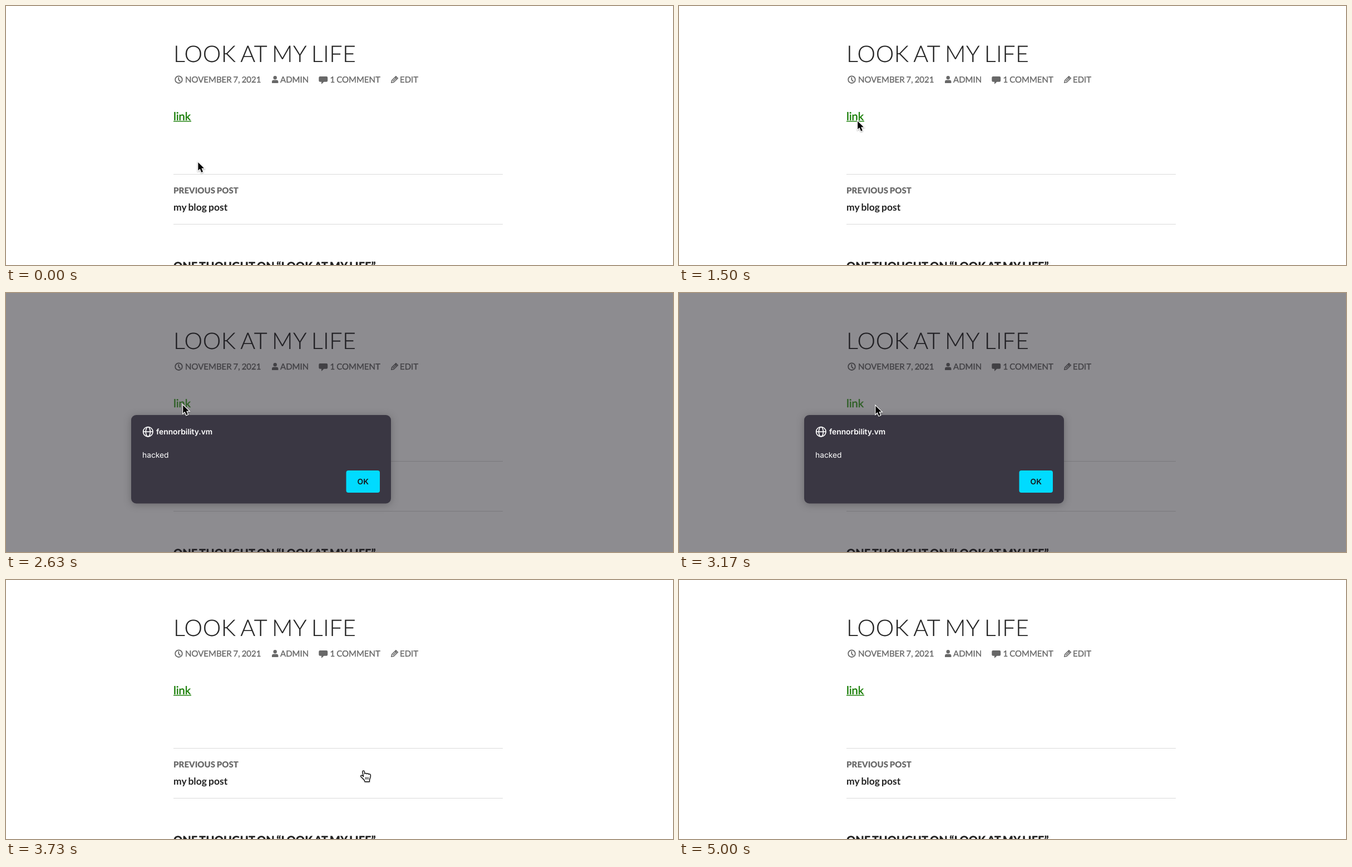
An HTML page that plays this animation: 1199 by 467 pixels, repeating every 5230 ms.

```html
<!DOCTYPE html>
<html lang="en">
<head>
<meta charset="utf-8">
<title>Blog post</title>
<style>
  html, body { margin: 0; width: 100%; height: 100%; overflow: hidden; background: #fff; }
  svg { display: block; width: 1199px; height: 467px; }
  text { font-family: Lato, sans-serif; word-spacing: -.06em; text-rendering: geometricPrecision; }
  .title { font-size: 41.25px; font-weight: 300; letter-spacing: .011em; fill: #222; stroke: #222; stroke-width: .2; }
  .meta { font-size: 15px; fill: #686868; stroke: #686868; stroke-width: .35; }
  .icon { fill: #686868; }
  .line { fill: none; stroke: #686868; stroke-width: 1.8; }
  .link { font-size: 20px; fill: #1a7f08; stroke: #1a7f08; stroke-width: .5; }
  .link.active { fill: #41a62a; stroke: #41a62a; }
  .label { font-size: 15px; font-weight: 900; fill: #6a6a6a; }
  .prev { font-size: 17.5px; font-weight: 700; fill: #222; }
  .prev.hover { fill: #41a62a; }
  .thought { font-size: 20px; font-weight: 900; fill: #222; }
  #dialog text { font-family: Inter, "Liberation Sans", sans-serif; font-size: 13.8px; fill: #fff; }
  #dialog .bold { font-weight: 600; }
  #panel { filter: drop-shadow(0 2px 7px rgba(0, 0, 0, .25)); }
  #cursor { filter: drop-shadow(0 1px 1px rgba(0, 0, 0, .35)); }
</style>
</head>
<body>
<svg viewBox="0 0 1199 467">
  <text class="title" x="301" y="101.3">LOOK AT MY LIFE</text>

  <g class="line">
    <circle cx="310.5" cy="132.7" r="6.3"/>
    <path d="M310.3 128.6V133l3 3"/>
  </g>
  <text class="meta" x="322" y="138.4">NOVEMBER 7, 2021</text>
  <g class="icon">
    <circle cx="483.7" cy="129.2" r="3.2"/>
    <path d="M478 139v-2.4q0-3.2 3.2-3.2h5q3.2 0 3.2 3.2v2.4z"/>
  </g>
  <text class="meta" x="493" y="138.4">ADMIN</text>
  <path class="icon" d="M564.5 127h11.5q2.2 0 2.2 2.2v5.4q0 2.2-2.2 2.2h-4.6l-4.4 4.2v-4.2h-2.5q-2.2 0-2.2-2.2v-5.4q0-2.2 2.2-2.2z"/>
  <text class="meta" x="582.5" y="138.4">1 COMMENT</text>
  <g class="line" style="stroke-width:1.5">
    <path d="M692.8 138.2l.8-4 7.3-7.3 3.4 3.3-7.4 7.3zM695.4 135.7l6-6M699.4 128.4l3.4 3.4"/>
  </g>
  <text class="meta" x="708" y="138.4">EDIT</text>

  <text id="link" class="link" x="301" y="206">link</text>
  <rect id="underline" x="301" y="207.2" width="32" height="1.4" fill="#1a7f08"/>

  <path d="M301 303.5H893M301 393.5H893" stroke="#dadada"/>
  <text class="label" x="301" y="338.3">PREVIOUS POST</text>
  <text id="prev" class="prev" x="301" y="369.3">my blog post</text>
  <text class="thought" x="301" y="475.5">ONE THOUGHT ON “LOOK AT MY LIFE”</text>

  <g id="dialog">
    <rect width="1199" height="467" fill="#1c1b22" opacity=".5"/>
    <rect id="panel" x="225" y="220" width="467" height="159.5" rx="9" fill="#3a3743"/>
    <g fill="none" stroke="#fff" stroke-width="1.6">
      <circle cx="255.3" cy="250.2" r="8.7"/>
      <ellipse cx="255.3" cy="250.2" rx="4" ry="8.7"/>
      <path d="M246.6 250.2h17.4"/>
    </g>
    <text class="bold" x="270" y="255">fennorbility.vm</text>
    <text x="245" y="296.6">hacked</text>
    <rect id="button" x="611.5" y="320" width="60.5" height="40" rx="4"/>
    <text class="bold" x="641.7" y="345.2" text-anchor="middle" style="fill:#15141a">OK</text>
  </g>

  <g id="cursor">
    <path id="arrow" d="M0 0V14.6L3.3 11.5 5.9 17.9 8.6 16.8 6 10.5H10.6Z"
      fill="#000" stroke="#fff" stroke-width="2.4" paint-order="stroke"/>
    <g id="hand" transform="translate(-5.3 -1)" stroke="#000" stroke-width="1.3" stroke-linejoin="round">
      <path fill="#fff" d="M3.9 2.6Q4 .9 5.5 .9 7 .9 7.2 2.4L8 6.7q.2-1.4 1.8-1.4 1.5 0 1.8 1.6.3-1 1.7-1 1.4 0 1.7 1.7.3-.8 1.4-.7 1.9.2 1.9 2.6C18.3 13 17 15 16.4 17.2V20.6H8.2Q7.9 18.5 6 16.5L1.3 11.9Q.2 10.2 1.4 9.4 2.8 8.6 4.3 10.2L5.6 11.5Z"/>
      <path fill="none" stroke-width="1" d="M9.3 12.4v4.2M11.7 12.4v4.2M14.1 12.4v4.2"/>
    </g>
  </g>
</svg>
<script>
const LOOP = 5230;
const OPEN = 1530, PRESS = 3630, CLOSE = 3730;
const NAV_ENTER = 560, NAV_REHOVER = 4000;

const smooth = k => k * k * (3 - 2 * k);
const linear = k => k;

// Each move bends from the last spot through a control point to the next.
const home = [345.4, 282];
const moves = [
  { from: 20, until: 270, to: [329.5, 326] },
  { from: NAV_ENTER, until: 670, to: [335, 312.5] },
  { from: 960, until: OPEN, to: [320.8, 207], via: [348, 250] },
  { from: OPEN, until: 2250, to: [318.2, 202.2] },
  { from: 3080, until: 3600, to: [642.3, 344], via: [540, 205] },
  { from: 4262, until: 4400, to: [985, -30], via: [790, 330], ease: linear }
];

function cursorAt(t) {
  let spot = home;
  for (const { from, until, to, via, ease = smooth } of moves) {
    if (t < from) break;
    const k = ease(Math.min(1, (t - from) / (until - from)));
    spot = spot.map((a, i) => {
      const mid = via ? via[i] : (a + to[i]) / 2;
      return (1 - k) ** 2 * a + 2 * k * (1 - k) * mid + k * k * to[i];
    });
  }
  return spot;
}

const el = id => document.getElementById(id);
const show = (id, on) => { el(id).style.display = on ? "" : "none"; };

function draw(t) {
  const [x, y] = cursorAt(t);
  const open = t >= OPEN && t < CLOSE;
  const overNav = !open && t >= NAV_ENTER && y > 304;
  const overButton = open && x > 612 && y > 320;
  const hand = overNav || overButton;

  show("dialog", open);
  show("underline", !open);
  el("link").classList.toggle("active", open);
  el("prev").classList.toggle("hover", overNav && (t < OPEN || t >= NAV_REHOVER));
  el("button").setAttribute("fill", !overButton ? "#00dbff" : t < PRESS ? "#80ebff" : "#a3f1ff");
  show("hand", hand);
  show("arrow", !hand);
  el("cursor").setAttribute("transform", `translate(${x} ${y})`);
}

const start = performance.now();
function tick() {
  draw((performance.now() - start) % LOOP);
  requestAnimationFrame(tick);
}
tick();
</script>
</body>
</html>
```
